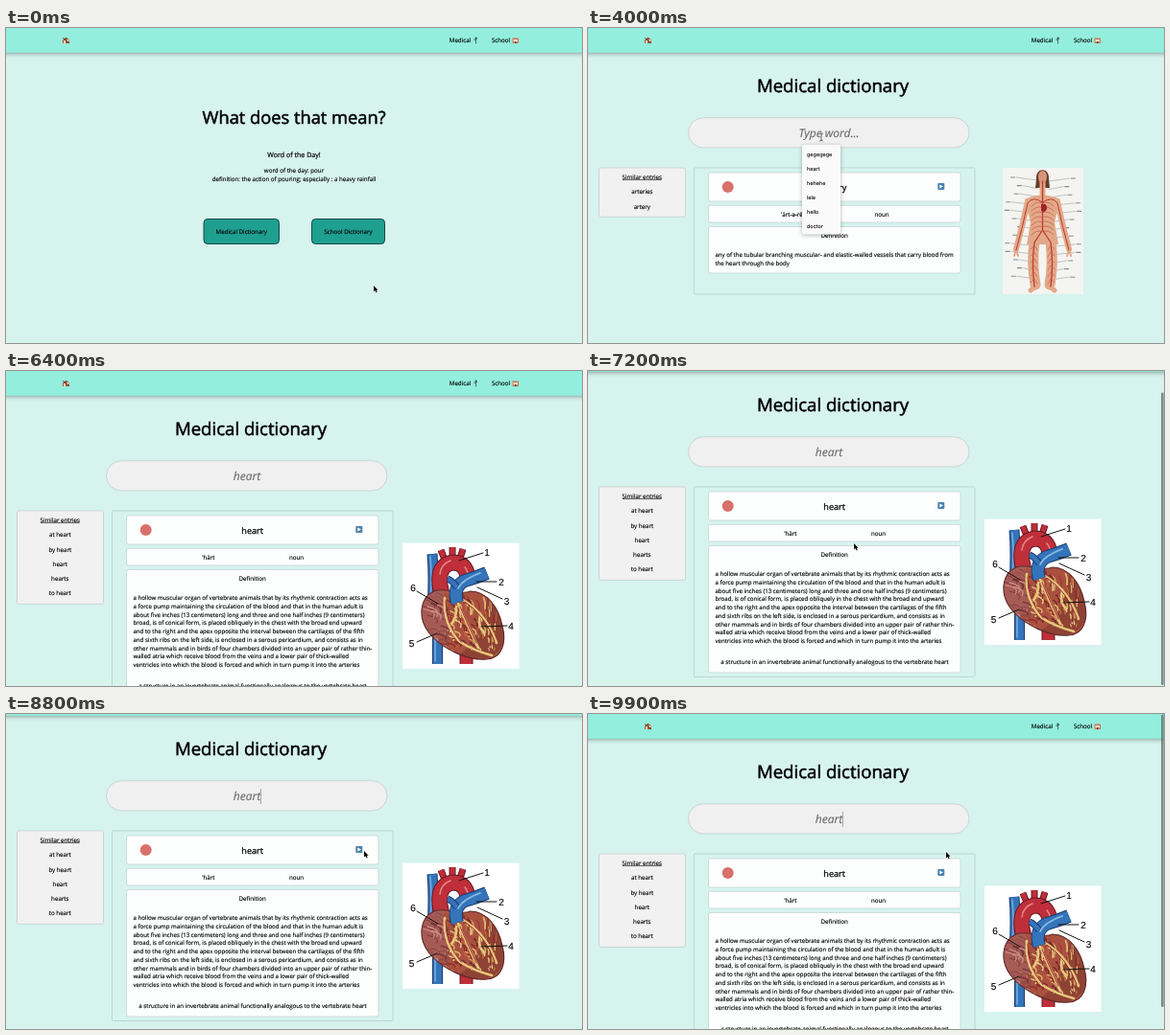
Recreate the animation shown at these times as an HTML page with a canvas. Size 600 by 329 pixels, loop 10000 ms.

```html
<!DOCTYPE html>
<html lang="en">
<head>
<meta charset="utf-8">
<title>Dictionary</title>
<style>
html, body { margin: 0; width: 100%; height: 100%; overflow: hidden; background: #d6f3ee; }
canvas { display: block; }
</style>
</head>
<body>
<canvas id="stage" width="600" height="329"></canvas>
<script>
const ctx = document.getElementById('stage').getContext('2d');
const LOOP = 10000, BG = '#d6f3ee';
const SANS = '"Open Sans", "Noto Sans", sans-serif';
const ARIAL = '"Liberation Sans", Arial, sans-serif';
const UI = 'Inter, sans-serif';

// Times of the steps in the story
const OPEN_PAGE = 2150, LOADED = 2300, DROP_OPEN = 3700, PICK = 5000, RESULT = 5900;

const ARTERY = {
  word: 'artery', sound: 'ˈärt-ə-rē', similar: ['arteries', 'artery'],
  cardEnd: 105, boxEnd: 127,
  lines: ['any of the tubular branching muscular- and elastic-walled vessels that carry blood from',
    'the heart through the body']
};
const HEART = {
  word: 'heart', sound: 'ˈhärt', similar: ['at heart', 'by heart', 'heart', 'hearts', 'to heart'],
  cardEnd: 189, boxEnd: 193.5,
  lines: ['a hollow muscular organ of vertebrate animals that by its rhythmic contraction acts as',
    'a force pump maintaining the circulation of the blood and that in the human adult is',
    'about five inches (13 centimeters) long and three and one half inches (9 centimeters)',
    'broad, is of conical form, is placed obliquely in the chest with the broad end upward',
    'and to the right and the apex opposite the interval between the cartilages of the fifth',
    'and sixth ribs on the left side, is enclosed in a serous pericardium, and consists as in',
    'other mammals and in birds of four chambers divided into an upper pair of rather thin-',
    'walled atria which receive blood from the veins and a lower pair of thick-walled',
    'ventricles into which the blood is forced and which in turn pump it into the arteries'],
  extra: 'a structure in an invertebrate animal functionally analogous to the vertebrate heart'
};

// Keyframes: time followed by values, eased between neighbours
const POINTER = [[0, 383, 269], [300, 383, 269], [1000, 262, 214], [2100, 256, 212], [2700, 256, 212],
  [3600, 243, 114], [4200, 243, 114], [4700, 237, 146], [6400, 237, 146], [7000, 277, 180],
  [7400, 277, 180], [8500, 373, 143], [9900, 373, 144]];
const SCROLL = [[0, 0], [6500, 0], [7000, 25], [7300, 25], [7600, 24], [9300, 24], [9750, 0]];

function at(keys, t) {
  const i = keys.findIndex(k => k[0] > t);
  if (i < 0) return keys[keys.length - 1].slice(1);
  const [t0, ...from] = keys[i - 1], [t1, ...to] = keys[i];
  const u = (t - t0) / (t1 - t0), e = u * u * (3 - 2 * u);
  return from.map((v, k) => v + (to[k] - v) * e);
}

// y is the middle of the capitals
function text(str, x, y, size = 6.2, { align = 'center', color = '#000', family = SANS, style = '', bold = .14 } = {}) {
  ctx.font = `${style} ${size}px ${family}`;
  ctx.textAlign = align;
  ctx.lineJoin = 'round';
  ctx.fillStyle = ctx.strokeStyle = color;
  ctx.lineWidth = bold;
  ctx.fillText(str, x, y + size * .36);
  ctx.strokeText(str, x, y + size * .36);
}

function box(x0, y0, x1, y1, fill, border, radius = 2, width = .7) {
  ctx.beginPath();
  ctx.roundRect(x0, y0, x1 - x0, y1 - y0, radius);
  if (fill) { ctx.fillStyle = fill; ctx.fill(); }
  if (border) { ctx.strokeStyle = border; ctx.lineWidth = width; ctx.stroke(); }
}

function fill(path, color) {
  ctx.fillStyle = color;
  ctx.fill(new Path2D(path));
}

function stroke(path, color, width = 1, cap = 'round') {
  ctx.strokeStyle = color;
  ctx.lineWidth = width;
  ctx.lineCap = cap;
  ctx.lineJoin = 'round';
  ctx.stroke(new Path2D(path));
}

function shadowed(color, blur, dy, draw) {
  ctx.save();
  ctx.shadowColor = color;
  ctx.shadowBlur = blur;
  ctx.shadowOffsetY = dy;
  draw();
  ctx.restore();
}

function header() {
  shadowed('rgba(0,0,0,.4)', 5, 1.5, () => box(-10, -20, 610, 25.8, '#93eedd', null, 0));
  fill('M59 12.5L62.5 9.5L66 12.5V16H59Z', '#a4573f');
  fill('M60 13h2v3h-2zM63.5 12h2v2h-2z', '#efd9b4');
  stroke('M59.5 10.5L65.5 15.5', '#4c2a2a', .8);
  text('Medical', 473, 12.5);
  stroke('M489.5 10V16M488 11Q489.5 9 491 11Q489.5 13 488 12.5', '#34504e', .8);
  text('School', 515.5, 12.5);
  fill('M527.5 10.5h6.5v5.5h-6.5z', '#c9785c');
  fill('M528.5 12h4.5v2.5h-4.5z', '#f0dcc0');
  fill('M530 14h1.5v2h-1.5z', '#6d4137');
}

function home() {
  text('What does that mean?', 300, 93, 18.3, { bold: .5 });
  text('Word of the Day!', 300, 132, 7.1, { bold: .2 });
  text('word of the day: pour', 300, 149);
  text('definition: the action of pouring; especially : a heavy rainfall', 300, 157.7);
  box(206, 199.5, 284.5, 225.5, '#1f9f90', '#0b3d37', 4, .9);
  box(318.5, 199.5, 394.5, 225.5, '#1f9f90', '#0b3d37', 4, .9);
  text('Medical Dictionary', 245.3, 212.7);
  text('School Dictionary', 356.5, 212.7);
}

function bodyChart() {
  box(432, 146, 516, 278, '#f4f4f1', null, 0);
  for (let i = 0; i < 13; i++) {
    const y = 156 + i * 8.6, spread = 7 * Math.sin(i * 1.3);
    stroke(`M${446 + spread} ${y}L468 ${y + 3}M${502 - spread} ${y + 1}L480 ${y + 4}`, '#77777a', .4);
    stroke(`M${440 + spread} ${y}h5M${503 - spread} ${y + 1}h5`, '#8b8b8e', 1.1, 'butt');
  }
  const skin = '#e2a988';
  fill('M467 158C466 145 481 145 480 158L481 167H466Z', '#633c2c');
  stroke('M473.5 162V174', skin, 6);
  stroke('M458 181Q453 205 446 231M489 181Q494 205 501 231', skin, 6);
  stroke('M446 231l-2 7M446 231l2 7M501 231l2 7M501 231l-2 7', skin, 2);
  fill('M455 179Q473 170 492 179L486 203L490 226H457L461 203Z', skin);
  stroke('M465 223Q462 246 466 268M482 223Q485 246 481 268', skin, 11);
  stroke('M465 262V271L461 274M482 262V271L486 274', skin, 5);
  fill('M469 155a4.5 6 0 0 1 9 0q0 6-4.5 9q-4.5-3-4.5-9Z', '#d99577');
  const red = '#bd3a35';
  stroke('M473.5 160V211L465 224Q462 246 465 270M473.5 211L482 224Q485 246 482 270', red, 1.3);
  stroke('M473.5 182Q463 175 458 183Q453 207 446 232M473.5 182Q484 175 489 183Q494 207 501 232', red, 1);
  for (let i = 0; i < 7; i++) {
    const y = 183 + i * 5;
    stroke(`M462 ${y + 3}Q468 ${y - 3} 473 ${y}Q479 ${y - 3} 485 ${y + 3}`, '#c8574a', .7);
  }
  for (let i = 0; i < 6; i++) {
    const y = 228 + i * 7;
    stroke(`M461 ${y + 3}l4-4l3 5M486 ${y + 3}l-4-4l-3 5`, '#c8574a', .6);
  }
  fill('M472 184q7-1 6 5q-2 5-6 2Z', '#9f2628');
}

function heartChart() {
  box(413, 179.5, 534.5, 311, '#fff', null, 0);
  const blue = '#3474b8', deepBlue = '#1c3a70', red = '#bf2f3a', deepRed = '#641a26';
  const tube = (path, color, edge, w) => { stroke(path, edge, w, 'butt'); stroke(path, color, w - 2, 'butt'); };
  tube('M444 191Q446 215 444 249M449.5 272V306', blue, deepBlue, 11);
  stroke('M442 194Q444 215 442 240M447 280V303', '#79aede', 1.5);
  tube('M479.5 288V306', red, deepRed, 14);
  tube('M453 187L459 202M465 184V202M476 186L471 202', red, deepRed, 7);
  tube('M456 240Q444 204 465 200Q482 200 481 222', red, deepRed, 17);
  stroke('M452 212Q453 202 463 198M478 205Q482 210 481 214', '#e58585', 1.6);

  const muscle = 'M446 230C430 237 429 259 441 274C455 291 482 303 501 301C516 300 522 285 517 266C513 247 501 230 484 230C472 235 457 225 446 230Z';
  fill(muscle, '#a9503f');
  ctx.save();
  ctx.clip(new Path2D(muscle));
  fill('M430 225H457Q453 251 463 265L449 284Q423 257 430 225Z', '#a65b55');
  fill('M502 231Q527 259 518 286Q502 311 469 297Q496 286 502 231Z', '#8f4234');
  // Muscle fibres and fat run down towards the apex
  let seed = 7;
  const rnd = () => (seed = seed * 16807 % 2147483647) / 2147483647;
  const fibres = ['#dcb468', '#74242a', '#e8cd88', '#c4703f', '#8f2a2e'];
  for (let i = 0; i < 130; i++) {
    const x = 433 + rnd() * 80, y = 230 + rnd() * 62;
    const dx = (508 - x) * .14, dy = (306 - y) * .16;
    const tint = x < 455 ? ['#c98a80', '#75333a', '#8b4a4a'][i % 3] : fibres[i % 5];
    stroke(`M${x} ${y}q${dx * 1.4} ${dy * .3} ${dx} ${dy}`, tint, .7 + rnd());
  }
  stroke('M457 237Q455 264 473 283Q487 292 506 297M476 239Q500 253 511 284M471 243Q480 264 492 289M462 267Q470 258 469 246M494 254Q491 266 498 274', '#e6c87c', 2.6);
  stroke('M458 240Q457 263 474 283M478 241Q499 255 509 282M473 246Q481 265 490 284', '#96282d', .9);
  ctx.restore();
  stroke(muscle, '#5d2a2a', 1.1);
  tube('M470 242Q465 225 478 219Q489 216 501 211', blue, deepBlue, 14);
  tube('M470 226Q465 219 460 217', blue, deepBlue, 7);
  stroke('M471 227Q475 218 494 211', '#8abbe4', 1.8);

  stroke('M472 198L497 190M490 220H511M491 226L517 238M495 267L522 266M428 283L449 274M428 230L450 243', '#111', 1);
  [[501, 189], [516, 220], [521.5, 240], [526, 266], [422.5, 284], [424, 226]]
    .forEach(([x, y], i) => text(i + 1, x, y, 10, { family: ARIAL }));
}

function medical(t) {
  const loaded = t >= LOADED, entry = t < RESULT ? ARTERY : HEART;
  const top = loaded ? 151 : 149, white = '#fdfefe', line = '#bfd0cd';
  const typed = t >= PICK, query = typed ? 'heart' : 'Type word...';

  text('Medical dictionary', 255, 60, 18.6, { bold: .5 });
  box(104.5, 93.8, 397, loaded ? 125 : 123, '#f0f0f0', '#bcc9c6', 16);
  text(query, 251, loaded ? 110 : 108.5, loaded ? 12 : 13.1,
    { style: 'italic', color: '#6a6a6a', family: loaded ? SANS : ARIAL });
  if (typed && t % 1000 >= 500) stroke('M265.500 102V118', '#888', .7, 'butt');

  box(11.5, top - 5, 101.5, top + 15.4 + 15.4 * entry.similar.length, '#f1f1f1', '#c2c9c7');
  text('Similar entries', 56.3, top + 4.5);
  stroke(`M36 ${top + 7.6}H76.7`, '#000', .6, 'butt');
  entry.similar.forEach((word, i) => text(word, 56.3, top + 20 + 15.3 * i));

  box(110.5, top - 5, 403, top + entry.boxEnd, null, '#b4cbc7', 1);
  [[0, 30], [34.3, 52], [56.5, entry.cardEnd]].forEach(([a, b]) =>
    box(125.5, top + a, 388, top + b, white, line));
  text(entry.word, 256.7, top + 15.3, 9.1, { bold: .25 });
  if (loaded) {
    ctx.beginPath();
    ctx.arc(145.7, top + 15, 6, 0, 7);
    ctx.fillStyle = '#d8706c';
    ctx.fill();
  }
  box(364.3, top + 11, 371.3, top + 18, '#4a83ad', null, 1);
  fill(`M366.3 ${top + 12.5}v4l3.6-2Z`, '#fff');
  text(entry.sound, entry === ARTERY ? 212.5 : 211, top + 43.7);
  text('noun', entry === ARTERY ? 306 : 302.5, top + 43.7);
  text('Definition', 256.7, top + 65.7);
  entry.lines.forEach((str, i) => text(str, 132.4, top + 86 + 8.75 * i, 6.13, { align: 'left' }));
  if (entry.extra) text(entry.extra, 257, top + 177.5, 6.15);

  if (loaded) (entry === ARTERY ? bodyChart : heartChart)();
  if (t >= DROP_OPEN && t < PICK) dropdown(t);
}

function dropdown(t) {
  shadowed('rgba(0,0,0,.3)', 4, 1, () => box(223, 122, 263, 215.5, '#fafafa', null, 2));
  if (t > 4600) box(223, 139.5, 263, 154, '#e2e4e4', null, 0);
  ['gegegege', 'heart', 'hehehe', 'lele', 'hello', 'doctor'].forEach((word, i) =>
    text(word, 228, 131.7 + 15.05 * i, 5.5, { align: 'left', family: UI, color: '#222' }));
}

function statusBar(t) {
  ctx.globalAlpha = t < 2100 ? Math.min(1, (t - 800) / 150) : Math.max(0, 1 - (t - 2100) / 220);
  box(-3, 320.5, 200, 332, '#dfe3e2', '#c3cfcc', 2);
  text('https://schoolmedicaldictionary.netlify.app/medical', 1.5, 324.8, 4.9,
    { align: 'left', family: UI, color: '#666' });
  ctx.globalAlpha = 1;
}

function pointer(t) {
  const [x, y] = at(POINTER, t);
  const overField = t >= OPEN_PAGE && t < 4450;
  const overLink = t > 800 && t < OPEN_PAGE;
  ctx.save();
  ctx.translate(x, y);
  if (overField) {
    const beam = 'M-1.5 -4Q0 -4 0 -3V3Q0 4 -1.5 4M1.5 -4Q0 -4 0 -3M0 3Q0 4 1.5 4';
    stroke(beam, '#fff', 1.6);
    stroke(beam, '#222', .7);
  } else {
    const shape = overLink
      ? 'M-.7 0Q0 -1 .7 0V2.5L3.5 3.2V6L2.5 8H-1.2L-3 4.7L-2.3 4L-.7 5Z'
      : 'M0 0V6.4L1.5 5.1L2.6 7.4L3.7 6.9L2.7 4.7H4.6Z';
    stroke(shape, overLink ? '#111' : '#fff', 1.1);
    fill(shape, overLink ? '#fff' : '#000');
  }
  ctx.restore();
}

function scrollbar(t, scroll) {
  const shown = (t > 6500 && t < 8000) || t > 9300;
  if (!shown) return;
  const y = scroll * .88;
  box(597, y + .5, 599.7, y + 306, 'rgba(90,110,106,.75)', null, 1.4);
}

function render(t) {
  const [scroll] = at(SCROLL, t);
  ctx.fillStyle = BG;
  ctx.fillRect(0, 0, 600, 329);
  ctx.save();
  ctx.translate(0, -scroll);
  if (t < OPEN_PAGE) home(); else medical(t);
  header();
  ctx.restore();
  if (t > 800 && t < 2320) statusBar(t);
  scrollbar(t, scroll);
  if (t < 5500 || t > 6450) pointer(t);
}

ctx.textRendering = 'geometricPrecision';
function tick() {
  render(performance.now() % LOOP);
  requestAnimationFrame(tick);
}
tick();
</script>
</body>
</html>
```
